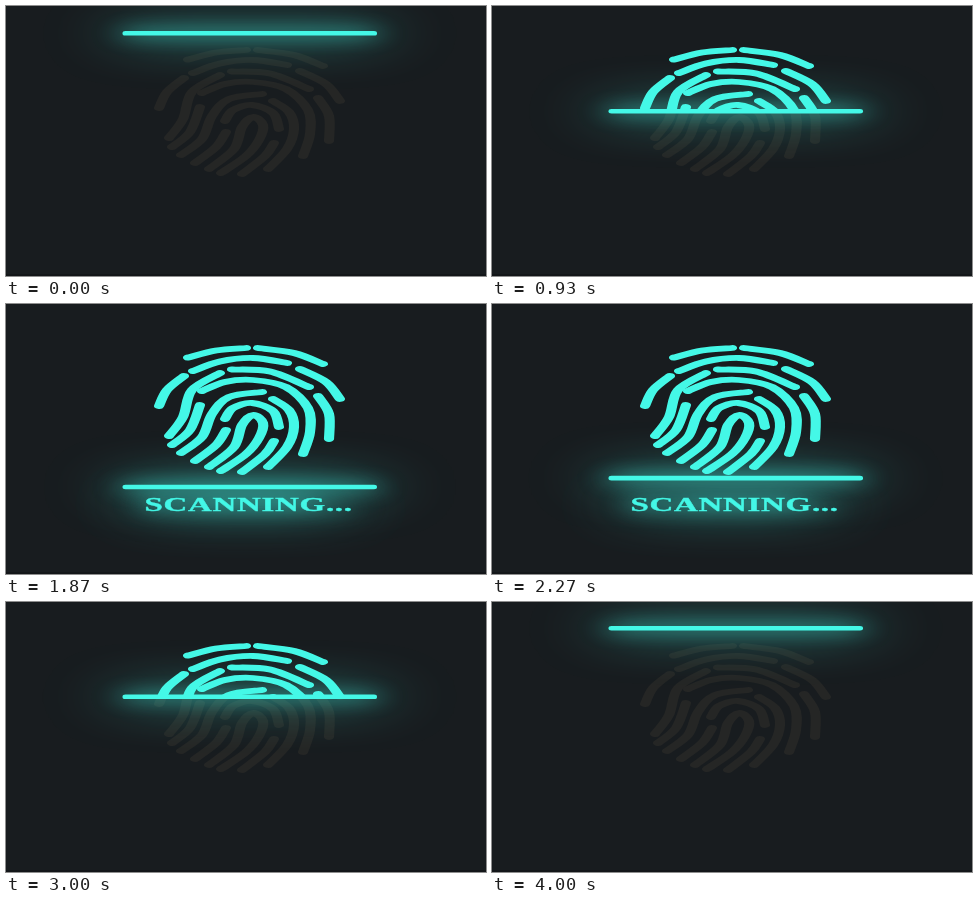
Write an HTML page that moves like this. It is 480 by 270 pixels and loops after 4.07 s.

```html
<!DOCTYPE html>
<html lang="en">
<head>
<meta charset="utf-8">
<title>Fingerprint scan</title>
<style>
  html, body { margin: 0; width: 100%; height: 100%; overflow: hidden; background: #181c1f; }
  svg { display: block; width: 100vw; height: 100vh; }
  #ridges path { fill: none; stroke-width: 5.8; stroke-linecap: round; stroke-linejoin: round; }
  .dim { stroke: #252625; }
  .lit { stroke: #44f8e7; }
  .glow { fill: #44f8e7; }
  text { font: bold 18px "Liberation Serif", "Times New Roman", serif; letter-spacing: 0.4px; stroke: #44f8e7; stroke-width: 0.35; }
</style>
</head>
<body>
<svg viewBox="0 0 480 270" preserveAspectRatio="none">
  <defs>
    <filter id="halo" filterUnits="userSpaceOnUse" x="-40" y="-100" width="560" height="440" color-interpolation-filters="sRGB">
      <feGaussianBlur in="SourceGraphic" stdDeviation="15 8.5" result="near"/>
      <feMerge result="both"><feMergeNode in="near"/><feMergeNode in="SourceGraphic"/></feMerge>
      <feGaussianBlur in="both" stdDeviation="38 21" result="far"/>
      <feMerge><feMergeNode in="far"/><feMergeNode in="near"/></feMerge>
    </filter>
    <clipPath id="scanned"><rect id="reveal" width="480" height="0"/></clipPath>
    <!-- The scene is squashed, so strokes and letters are wider than tall -->
    <g id="ridges" transform="scale(1.75 1)"></g>
    <text id="word" transform="translate(138.4 207) scale(1.83 1)">SCANNING...</text>
    <rect id="bar" x="116.5" y="-2.3" width="254.5" height="4.6" rx="3" ry="2.2"/>
  </defs>
  <rect width="480" height="270" fill="#181c1f"/>
  <rect y="268" width="480" height="2" fill="#131619"/>
  <use href="#ridges" class="dim"/>
  <g id="label" class="glow">
    <g filter="url(#halo)" opacity="0.85"><use href="#word"/></g>
    <use href="#word"/>
  </g>
  <g id="halo-bar" class="glow"><g filter="url(#halo)"><use href="#bar"/></g></g>
  <g clip-path="url(#scanned)"><use href="#ridges" class="lit"/></g>
  <g id="beam" class="glow"><use href="#bar"/></g>
</svg>
<script>
const $ = id => document.getElementById(id);
const STRETCH = 1.75, LOOP = 4070, FPS = 15;
const TOP = 25.8, BOTTOM = 183.3;

// Ridge centre lines, from the outer ring to the core
const ridges = [
  "182,53.5 210,46.5 240,44",
  "252,44 288,49 317,60",
  "153,102 161,86 178,72",
  "187,67 214,57.5 247,54 281,59",
  "294,65 320,78 334,95",
  "163,132 177,113 186,86 214,69",
  "226,65.5 264,67.5 303,83",
  "312,92 323,110 323,135",
  "166,141 184,126 194,101",
  "196,87 219,78 247,76 280,83 302,104 304,128 297,150",
  "175,149 196,133 206,110 223,93 256,88",
  "267,95 283,106 288,123 281,143 262,163",
  "219,115 227,104 246,99 267,107 273,123",
  "220,126 210,141 189,157",
  "268,137 259,150 236,168",
  "203,163 228,143 236,121 247,111 257,119 253,134 240,150 215,167"
];

// Smooth curve through the points
function curve(text) {
  const pts = text.split(" ").map(p => p.split(",").map(Number)).map(([x, y]) => [x / STRETCH, y]);
  const at = i => pts[Math.max(0, Math.min(pts.length - 1, i))];
  let d = `M${at(0)}`;
  for (let i = 0; i < pts.length - 1; i++) {
    const [a, b, c, e] = [at(i - 1), at(i), at(i + 1), at(i + 2)];
    const c1 = b.map((v, k) => v + (c[k] - a[k]) / 6);
    const c2 = c.map((v, k) => v - (e[k] - b[k]) / 6);
    d += `C${c1} ${c2} ${c}`;
  }
  return d;
}

for (const r of ridges) {
  const path = document.createElementNS("http://www.w3.org/2000/svg", "path");
  path.setAttribute("d", curve(r));
  $("ridges").append(path);
}

// cubic-bezier(.42, 0, .58, 1)
function easeInOut(x) {
  let lo = 0, hi = 1;
  for (let i = 0; i < 30; i++) {
    const s = (lo + hi) / 2, r = 1 - s;
    if (3 * r * r * s * 0.42 + 3 * r * s * s * 0.58 + s * s * s < x) lo = s; else hi = s;
  }
  return lo * lo * (3 - 2 * lo);
}

function beamY(t) {
  const lead = 72 + 68 * Math.max(0, 1 - t / 400);
  const p = ((t + lead) % 4000) / 2000;
  return TOP + (BOTTOM - TOP) * easeInOut(p < 1 ? p : 2 - p);
}

function draw(now) {
  const step = Math.floor(((now % LOOP) + 4) * FPS / 1000);
  const t = Math.min(step, 60) * 1000 / FPS;
  const y = beamY(t);
  $("beam").setAttribute("transform", `translate(0 ${y})`);
  $("halo-bar").setAttribute("transform", `translate(0 ${y})`);
  $("reveal").setAttribute("height", y);
  $("label").setAttribute("visibility", (t + 88) % 500 >= 250 ? "visible" : "hidden");
}

let start;
function tick(now) {
  start ??= now;
  draw(now - start);
  requestAnimationFrame(tick);
}
draw(0);
requestAnimationFrame(tick);
</script>
</body>
</html>
```
